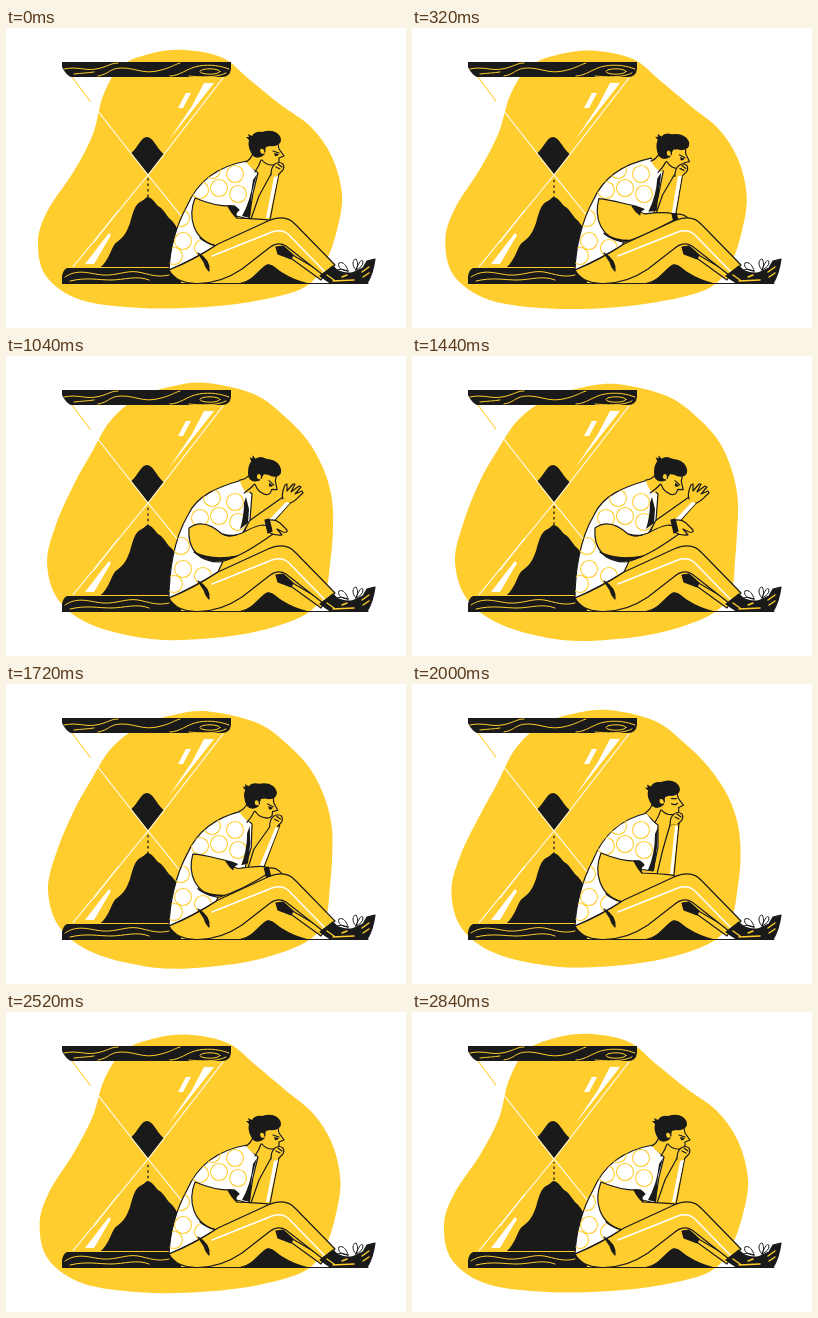
An HTML page that plays this animation: 400 by 300 pixels, repeating every 2.88 s.

```html
<!DOCTYPE html>
<html lang="en">
<head>
<meta charset="utf-8">
<title>Waiting</title>
<style>
  html, body { margin: 0; width: 100%; height: 100%; overflow: hidden; background: #fff; }
  svg { display: block; width: 100vw; height: 100vh; }
  .y { fill: #ffce2e; }
  .k { fill: #1a1a1a; }
  .w { fill: #fff; }
  .ink { stroke: #1a1a1a; stroke-width: 1.2; stroke-linejoin: round; stroke-linecap: round; }
  .line { fill: none; stroke-linecap: round; stroke-linejoin: round; }
  .white { stroke: #fff; }
  .gold { stroke: #ffce2e; }
</style>
</head>
<body>
<svg viewBox="0 0 400 300">
  <defs><clipPath id="shirtClip"><path data-part="torso"/></clipPath></defs>
  <path id="blob" class="y"/>

  <!-- hourglass -->
  <g class="line white" stroke-width="1.1">
    <path d="M84 73 L142 147 L217 50 M142 147 L66 240 M142 147 L176 189"/>
    <path d="M88 214 L112 183"/>
    <path class="gold" d="M66 49 L84 73"/>
  </g>
  <path class="w" d="M172 80 L180 65 L185 65 L177 80Z M163 112 L186 78 L198 55 L208 55 L190 78Z M79 236 L103 205 L105 207 L88 236Z"/>
  <path class="k" d="M125.500 125 C133 118 135 109 141 109 C147 109 150 119 157.500 126 L142 146Z"/>
  <path id="stream" class="line" stroke="#1a1a1a" stroke-width="1.3" stroke-dasharray="2.5 3" style="stroke-linecap:butt" d="M142 150V170"/>
  <path class="k" d="M94 240 C105 230 105 218 111 214 C119 208 121 203 124 195 C127 184 129 177 134 174 Q138 172 141 169 C146 169 149 175 152 178 C158 181 160 187 164 191 C170 196 176 205 180 240Z"/>
  <path class="k" d="M56 34 H225 V41 Q224 49 216 49 H65 Q60 47 56 39Z"/>
  <path class="k" d="M61 240 H175 V256 H56 V248 Q57 242 61 240Z"/>
  <g class="line gold" stroke-width="1">
    <path d="M62 239.500 H164"/>
    <path d="M58 41 C72 38 78 43 90 41 S104 35 112 35 M92 48 C104 46 103 40 116 40 S137 46 151 43 S167 37 174 35"/>
    <path d="M68 46 C76 45 82 45 88 44 M164 48 C174 48 181 40 193 38 S215 38 223 41 M183 48 C193 49 211 50 220 45"/>
    <ellipse cx="204" cy="43.500" rx="10" ry="2.700"/>
    <path d="M59 249 C72 240 84 246 97 247 S121 242 132 244 S151 250 163 247 M64 253 C81 249 92 252 105 252 S131 247 143 252"/>
  </g>
  <path class="line ink" d="M57 255.500 H362"/>

  <!-- figure -->
  <g class="ink">
    <path class="y" data-part="farArm"/>
    <path class="w" data-part="farStripe" style="stroke:none"/>
    <g id="openHand" data-part="openHand">
      <path class="y" d="M277 143 C275 138 277 134 279 129 L281 128 L281 135 L287 128 L289 128 L285 136 L293 130 L295 131 L289 138 L296 135 L297 137 C291 142 289 146 284 147"/>
    </g>
    <path class="w" data-part="torso"/>
  </g>
  <g clip-path="url(#shirtClip)"><g id="dots" class="line gold" stroke-width="1.1"></g></g>
  <path class="k" data-part="chest"/>
  <g data-part="head">
    <path class="y" d="M246 120 L240 134 Q245 141 252 143 L257 136 L270 137 L275 116Z"/>
    <path class="y ink" d="M272 116 L273 121 L278 128 L273 130 L273 134 Q271 138 266 137 Q260 137 256 132 M247 125 Q245 131 240 134 M255 132 Q253 138 249 144"/>
    <path class="k" d="M240 109 L243 109 L242 106 L246 108 Q249 103 256 104 Q265 101 271 105 Q277 110 274 115 Q270 119 264 118 L260 119 L258 127 Q252 132 247 128 Q241 119 243 112Z"/>
    <path class="y ink" d="M258 126 C253 128 252 120 256 120 Q259 121 259 124"/>
    <g id="openEye">
      <path class="line ink" d="M267 123 L273 125"/>
      <path class="k" d="M268 125 L273 126 Q271 129 269 128Z"/>
    </g>
    <path id="closedEye" class="line ink" d="M266 121 L271 121 M266 126 Q269 128 272 126"/>
  </g>
  <g id="fist"><g data-part="fist">
    <path class="y ink" d="M265 147 Q265 139 269 136 Q273 133 277 136 Q279 140 276 143 L273 146 M270 139 L274 141 M272 136 L276 139"/>
  </g></g>
  <g class="ink">
    <path class="y" data-part="arm"/>
    <path class="k" data-part="sleeve"/>
    <path class="k" data-part="shade"/>
    <g data-part="hand">
      <path class="y" d="M266 169 Q273 166 279 171 L286 178 Q287 181 282 180 L276 177 L281 183 Q274 184 267 180Z"/>
      <path class="k" d="M264 168 L268 167 L271 179 L267 181Z"/>
    </g>
    <!-- legs -->
    <path class="k" d="M234 255.500 C248 253 253 241 261 237 C267 236 269 241 276 245 Q287 252 301 255.500Z"/>
    <path class="y" d="M278 222 L319 246 L315 252 L286 231Z"/>
    <path class="y" d="M163 242 C181 235 197 226 212 216 L262 193 Q280 185 290 197 L329 237 L317 247 L280 218 Q272 213 263 220 L236 241 Q214 256 190 255.500 Q170 255 163 242Z"/>
    <path class="k" d="M270 219 L277 218 L287 227 L285 231 L272 226Z"/>
    <path class="k" d="M192 225 Q204 232 203 243 Q199 239 198 234Z"/>
    <path class="k" d="M314 248 L327 238 Q333 246 347 245 L351 255.500 H325Z"/>
    <path class="k" d="M344 246 L357 240 L361 233 L369 231 Q367 246 361 255.500 H349Z"/>
  </g>
  <path class="line white" stroke-width="1.5" d="M206 228 L266 204 Q277 200 284 208 L318 243"/>
  <path class="line gold" stroke-width="1.4" d="M321 247 L328 252 M327 253 L348 252 M356 244 L363 239 M357 249 L363 245 M336 249 L341 247"/>
  <g class="w ink" style="stroke-width:1">
    <path d="M342 243 C336 243 331 239 333 235 C337 233 341 238 342 243Z M342 243 Q334 240 331 242"/>
    <path d="M350 242 C345 237 347 231 350 231 C352 234 352 238 350 242 C353 234 356 230 357 234 Q357 239 350 242Z"/>
  </g>
</svg>
<script>
const LOOP = 2880;
const $ = id => document.getElementById(id);
const numbers = s => s.match(/-?\d+(\.\d+)?/g).map(Number);

// Each part: thinking, reading the watch, waving, sighing.
const poses = {
  torso: [
    'M163 242 C164 222 170 198 181 178 C190 157 207 139 241 133 Q247 141 252 145 L247 165 L243 191 L226 187 L209 218 Q188 231 163 242Z',
    'M163 242 C163 219 168 186 182 161 C191 141 212 132 236 125 Q242 134 250 139 L247 165 L238 180 L224 190 L212 216 Q188 231 163 242Z',
    'M163 242 C163 219 167 184 182 159 C191 139 212 131 236 124 Q240 133 246 138 L244 164 L236 178 L224 190 L212 216 Q188 231 163 242Z',
    'M163 242 C164 222 170 197 181 176 C190 154 205 136 235 129 Q240 137 246 141 L246 163 L241 187 L226 185 L209 218 Q188 231 163 242Z'],
  chest: [
    'M251 146 L246 164 L244 190 L236 188 Q245 172 247 152Z',
    'M246 142 L250 155 L246 169 L237 176 Q243 160 242 148Z',
    'M240 141 L243 153 L242 167 L234 173 Q238 160 238 147Z',
    'M246 143 L245 163 L242 187 L236 186 Q243 170 243 150Z'],
  farArm: [
    'M245 191 L253 168 L265 146 L273 145 L264 192',
    'M238 188 L246 165 L257 149 L267 143 L262 184',
    'M232 190 L243 165 L277 141 L285 146 L242 194',
    'M245 190 L251 165 L258 141 L267 139 L262 191'],
  farStripe: [
    'M268 149 L272 148 L263 190 L260 190Z',
    'M262 147 L266 145 L262 184 L258 184Z',
    'M280 146 L284 147 L242 193 L237 191Z',
    'M263 142 L266 142 L261 190 L258 190Z'],
  arm: [
    'M189 170 C182 188 186 212 211 218 C228 212 248 203 266 193 C262 191 248 191 231 190 C228 187 228 182 229 178 C215 179 201 175 189 170Z',
    'M183 172 C181 194 194 207 214 207 C232 204 250 192 269 182 C266 169 249 171 236 178 C229 181 222 182 216 179 C206 170 194 165 183 172Z',
    'M183 172 C181 194 194 206 214 206 C232 202 250 190 267 178 C264 163 249 170 236 177 C229 180 222 181 216 178 C206 169 194 164 183 172Z',
    'M189 169 C182 187 186 212 211 218 C228 212 248 203 264 193 C262 190 248 190 230 189 C227 186 227 181 228 177 C214 178 201 174 189 169Z'],
  sleeve: [
    'M222 178 Q229 177 233 182 Q228 185 231 190 Q226 186 222 178Z',
    'M217 179 Q222 181 230 180 Q226 181 222 181 Q219 180 217 179Z',
    'M217 178 Q222 180 230 179 Q226 180 222 180 Q219 179 217 178Z',
    'M222 177 Q229 176 232 181 Q227 184 230 189 Q226 185 222 177Z'],
  shade: [
    'M194 210 Q201 216 211 218 Q201 216 194 210Z',
    'M188 197 Q206 206 231 202 Q206 212 188 197Z',
    'M188 196 Q206 205 231 200 Q206 211 188 196Z',
    'M194 210 Q201 216 211 218 Q201 216 194 210Z'],
  hand: ['translate(-6 28)', 'translate(0 0)', 'translate(-5 -4)', 'translate(-6 28)'],
  head: [
    'translate(0 0) rotate(0 258 112)', 'translate(7 7) rotate(28 258 112)',
    'translate(1 -1) rotate(23 258 112)', 'translate(-7 -6) rotate(-2 258 112)'],
  fist: ['translate(0 0)', 'translate(-6 4)', 'translate(8 0)', 'translate(-7 -6)'],
  openHand: ['translate(-16 4)', 'translate(-20 6)', 'translate(0 0)', 'translate(-18 0)']
};

// [time, pose]: equal neighbours hold still.
const steps = [[0, 0], [160, 0], [560, 1], [680, 1], [960, 2], [1500, 2],
  [1880, 3], [2100, 3], [2440, 0], [LOOP, 0]];

const blobA = numbers('180 22 217 30 244 52 275 77 305 99 326 129 336 167 331 202 319 235 299 259 255 272 200 279 135 280 75 272 40 248 32 213 42 182 68 143 87 106 97 68 115 38 147 25');
const blobB = numbers('205 28 255 40 286 62 308 87 321 118 326 147 325 176 323 205 319 236 300 258 255 275 205 283 150 284 90 269 55 243 43 205 52 165 68 125 85 95 106 64 135 43 168 32');

const lerp = (a, b, k) => a + (b - a) * k;
const ease = k => (1 - Math.cos(Math.PI * k)) / 2;
const between = (t, a, b) => t >= a && t < b;
const show = (id, on) => { $(id).style.display = on ? '' : 'none'; };

function mix(a, b, k) {
  const end = numbers(b);
  let i = 0;
  return a.replace(/-?\d+(\.\d+)?/g, n => lerp(+n, end[i++], k).toFixed(2));
}

// Closed Catmull-Rom curve through flat x, y pairs.
function smooth(flat) {
  const count = flat.length / 2;
  const at = i => { const j = (i + count) % count * 2; return [flat[j], flat[j + 1]]; };
  let d = `M${at(0)}`;
  for (let i = 0; i < count; i++) {
    const [p, q, r, s] = [at(i - 1), at(i), at(i + 1), at(i + 2)];
    const c1 = q.map((v, n) => v + (r[n] - p[n]) / 6);
    const c2 = r.map((v, n) => v - (s[n] - q[n]) / 6);
    d += `C${c1} ${c2} ${r}`;
  }
  return d + 'Z';
}

$('dots').innerHTML = [[194, 162], [213, 160], [206, 142], [229, 146], [232, 166], [175, 190], [177, 213], [197, 220], [168, 228]]
  .map(([x, y]) => `<circle cx="${x}" cy="${y}" r="8.5"/>`).join('');

const parts = [...document.querySelectorAll('[data-part]')];

function draw(t) {
  const grow = ease(t / (LOOP / 2));
  $('blob').setAttribute('d', smooth(blobA.map((v, i) => lerp(v, blobB[i], grow))));
  $('stream').setAttribute('stroke-dashoffset', -(t / LOOP * 66) % 5.5);

  const next = steps.findIndex(s => s[0] > t);
  const [[t0, from], [t1, to]] = [steps[next - 1], steps[next]];
  const k = ease((t - t0) / (t1 - t0));
  for (const el of parts) {
    const list = poses[el.dataset.part];
    el.setAttribute(el.tagName === 'g' ? 'transform' : 'd', mix(list[from], list[to], k));
  }
  const closed = between(t, 1800, 2280);
  show('openEye', !closed);
  show('closedEye', closed);
  show('openHand', between(t, 760, 1680));
  show('fist', !between(t, 360, 1680));
}

const start = performance.now();
function tick() {
  draw((performance.now() - start) % LOOP);
  requestAnimationFrame(tick);
}
tick();
</script>
</body>
</html>
```
